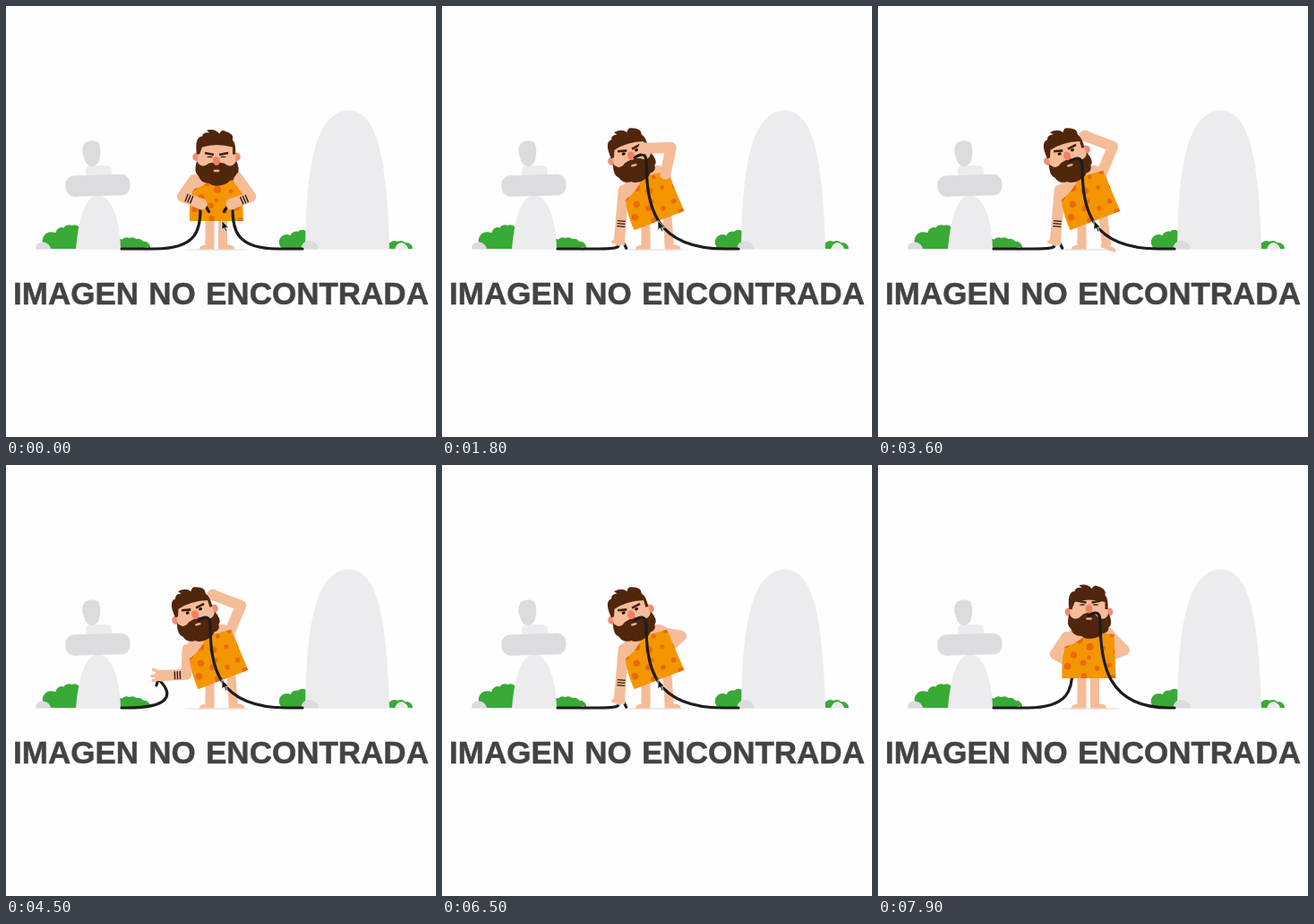
Write an HTML page that moves like this. It is 480 px wide and 481 px high and loops after 8000 ms.

```html
<!DOCTYPE html>
<html lang="es">
<head>
<meta charset="utf-8">
<title>Imagen no encontrada</title>
<style>
  html, body { margin: 0; width: 100%; height: 100%; overflow: hidden; background: #fefdff; }
  svg { display: block; width: 100vw; height: 100vh; }
  .skin { fill: #f5bc98; }
  .hair { fill: #50260d; }
  .pale { fill: #ecebed; }
  .grey { fill: #dcdbde; }
  .limb, .fingers { fill: none; stroke: #f5bc98; stroke-linecap: round; stroke-linejoin: round; }
  .limb { stroke-width: 12; }
  .leg { stroke-width: 10; }
  .fingers { stroke-width: 3.6; }
  .ink { fill: none; stroke: #2b1a14; stroke-width: 1.4; }
  .cable { fill: none; stroke: #1d1d1b; stroke-width: 3.2; stroke-linecap: round; }
</style>
</head>
<body>
<svg viewBox="0 0 480 481">
  <defs>
    <path id="cloth" d="M-30 0Q-31-20-27-35Q-10-40 0-52L28-49Q29-22 30 0Z"/>
    <clipPath id="clothClip"><use href="#cloth"/></clipPath>
  </defs>

  <g id="bushes" fill="#39aa35"></g>
  <path class="grey" d="M33 271.500Q33 263 42 263.500Q49 265 50 271.500Z"/>
  <circle class="pale" cx="157" cy="272" r="3"/>
  <path class="pale" d="M78 271.500C81 235 89 212 103 211C118 212 127 238 128 271.500Z"/>
  <rect class="pale" x="89" y="178" width="29" height="14" rx="6"/>
  <rect class="grey" x="66.500" y="188.500" width="72" height="23.500" rx="10" transform="rotate(-1.5 102 200)"/>
  <path class="grey" d="M88 153Q95 148 103 152Q107 160 104 172Q102 179 95 179Q89 178 87 169Q83 160 88 153Z"/>
  <path class="pale" d="M334 271.500C335 180 345 117 383 116.500C417 117 425 180 428 271.500Z"/>
  <path class="grey" d="M329 271.500Q330 262 339 262Q348 263 349 271.500Z"/>
  <path class="pale" d="M434 271.500Q436 264 442 264Q448 266 449 271.500Z"/>
  <ellipse cx="235" cy="272" rx="37" ry="1" fill="#e9e8eb"/>

  <g id="backSlot"></g>
  <path class="limb leg" d="M227.500 236V264"/>
  <path class="skin" d="M222.500 262H232.500V271.500H216Q216 267 222.500 267Z"/>
  <path id="leg" class="limb leg"/>
  <path id="foot" class="skin" d="M-5-5H5V0Q13 0 13 5H-5Z"/>
  <g id="body">
    <path class="skin" d="M-27-30L-25-46Q-22-56-10-60H14Q28-58 30-46L28-20Z"/>
    <use href="#cloth" fill="#f49600"/>
    <g id="spots" clip-path="url(#clothClip)" fill="#ea6a0a"></g>
  </g>
  <g id="frontLeftSlot"></g>
  <g id="head">
    <circle cx="-22" r="4.800" fill="#f08e74"/>
    <circle cx="22" r="4.800" fill="#f08e74"/>
    <rect class="skin" x="-21" y="-18" width="42" height="32" rx="4"/>
    <path class="hair" d="M-22-3C-24-15-22-23-16-23Q-15-28-8-27L-11-30Q-1-32 3-26Q6-31 9-29Q20-26 18-19Q22-13 21-3H18V-11Q0-16-16-11L-19-3Z"/>
    <path id="beard" class="hair" d="M-22 0C-19 7-14 7-9 3Q0 0 9 3C14 7 19 7 22 0C25 6 26 13 22 15Q22 22 15 22C11 28-4 30-8 25Q-18 25-20 17Q-26 13-22 0Z"/>
    <g id="face">
      <path class="hair" d="M0 1Q-6 0-11 7Q-4 9 0 5Q4 9 11 7Q6 0 0 1Z"/>
      <ellipse cy="7.500" rx="3.500" ry="1.300" fill="#f0ab91"/>
      <ellipse cy="-3.500" rx="4" ry="5" fill="#f27e68"/>
      <path d="M-13-12.500L-3-10.500M13-12.500L3-10.500" fill="none" stroke="#43200c" stroke-width="2.600"/>
      <ellipse class="eye" cx="-7.500" cy="-8" fill="#24130c"/>
      <ellipse class="eye" cx="7.500" cy="-8" fill="#24130c"/>
    </g>
  </g>
  <path id="rightCable" class="cable"/>
  <g id="frontRightSlot"></g>

  <g id="leftSide">
    <path id="leftCable" class="cable"/>
    <g id="leftArm"></g>
  </g>
  <g id="rightArm"></g>

  <path id="cursor" d="M241 239.500V250L243.500 247.800L245.300 252L247 251.200L245.200 247.200H248.600Z" fill="#111" stroke="#fff" stroke-width=".8"/>
  <text x="240" y="332.500" text-anchor="middle" font-family="'Liberation Sans', Arial, sans-serif" font-weight="700" font-size="35" word-spacing="1.5" fill="#434244" stroke="#434244" stroke-width=".5">IMAGEN NO ENCONTRADA</text>
</svg>
<script>
const LOOP = 8000, GROUND = 271;
const $ = id => document.getElementById(id);
const mix = (a, b, u) => a + (b - a) * u;
const draw = (el, d) => el.setAttribute('d', d);
const place = (el, x, y, angle = 0) => el.setAttribute('transform', `translate(${x} ${y}) rotate(${angle})`);
const eyes = document.querySelectorAll('.eye');

// Hip position, lean angle, how far the face looks down.
const posture = { hold: [235, 240, 0, 8], lean: [242.5, 239.5, -21, 4], back: [235.5, 238, 0, 0] };
// Hand position, elbow bend, direction of the plug, finger spread.
const leftHand = {
  hold: [218, 221, 18, 45, 0], ground: [198, 261, 0, 50, 4],
  raised: [173, 235, -19, 115, 9], back: [218, 222, 17, 45, 0]
};
// Hand position, elbow bend.
const rightHand = {
  hold: [252, 221, 18], up: [229, 130, -6], mouth: [225, 162, -26],
  scratch: [231, 145, -24], behind: [254, 203, 16], back: [256, 214, 17]
};
// Where the right cable is held, direction of the plug.
const rightPlug = { hold: [252, 221, 135], up: [229, 130, 150], mouth: [227, 172, 175], back: [247, 167, 175] };
const heel = { down: [0], raised: [1] };

// "name from-to" holds a pose; the gaps between holds are eased.
const track = (poses, plan) => plan.split(', ').flatMap(part => {
  const [name, span] = part.split(' ');
  return span.split('-').map(time => [+time, poses[name]]);
});
const tracks = {
  body: track(posture, 'hold 0-200, lean 800-6600, back 7200-8000'),
  left: track(leftHand, 'hold 0-200, ground 800-3700, raised 4200-4800, ground 5300-6600, back 7200-8000'),
  right: track(rightHand, 'hold 0-200, up 800-1150, mouth 1450-1750, up 2000-2150, mouth 2400-3100, scratch 3500-4700, up 5000-5000, behind 5400-6600, back 7200-8000'),
  plug: track(rightPlug, 'hold 0-200, up 800-1150, mouth 1450-1750, up 2000-2150, mouth 2400-6600, back 7200-8000'),
  heel: track(heel, 'down 0-2100, raised 2400-3300, down 3700-5200, raised 5500-6000, down 6300-8000')
};

function sample(keys, t) {
  const i = keys.findIndex(key => key[0] > t);
  const [t0, from] = keys[i - 1], [t1, to] = keys[i];
  const u = (t - t0) / (t1 - t0);
  return from.map((v, j) => mix(v, to[j], u * u * (3 - 2 * u)));
}

// A row of round lobes whose height rises to a peak and falls again.
function bush(x0, x1, height, lobes, peak) {
  let d = `M${x0} ${GROUND}`;
  for (let i = 0; i <= lobes; i++) {
    const u = i / lobes;
    const phase = u < peak ? u / peak / 2 : 1 - (1 - u) / (1 - peak) / 2;
    const y = GROUND - height * Math.sqrt(Math.max(0, Math.sin(Math.PI * phase)));
    d += `A7 7 0 0 1 ${mix(x0, x1, u)} ${y}`;
  }
  return `<path d="${d}Z"/>`;
}
$('bushes').innerHTML = bush(46, 92, 26, 5, .65) + bush(122, 161, 12, 5, .35) +
  bush(309, 360, 20, 6, .45) + bush(420, 454, 8, 4, .5);

// Spots spread over the cloth on a golden-angle spiral.
for (let i = 0; i < 20; i++) {
  const r = 8.6 * Math.sqrt(i), a = i * 2.4;
  $('spots').innerHTML += `<circle cx="${r * Math.cos(a)}" cy="${r * Math.sin(a) - 23}" r="${2.4 + i * 7 % 5 * .45}"/>`;
}

for (const id of ['leftArm', 'rightArm']) {
  $(id).innerHTML = '<path class="limb"/><g><circle class="skin" r="6.5"/><path class="fingers"/></g>' +
    '<path class="ink" d="M-3-5V4M0-5V4M3-5V4"/>';
}

function shoulder([x, y, tilt], side) {
  const a = tilt * Math.PI / 180, u = 25 * side, v = -46;
  return [x + u * Math.cos(a) - v * Math.sin(a), y + u * Math.sin(a) + v * Math.cos(a)];
}

function drawArm(id, body, side, [hx, hy, bend], spread, inked) {
  const [limb, hand, ink] = $(id).children;
  const [sx, sy] = shoulder(body, side);
  const k = bend * side / Math.hypot(hx - sx, hy - sy);
  const ex = (sx + hx) / 2 + (hy - sy) * k, ey = (sy + hy) / 2 - (hx - sx) * k;
  const angle = Math.atan2(hy - ey, hx - ex) * 180 / Math.PI;
  draw(limb, `M${sx} ${sy}L${ex} ${ey}L${hx} ${hy}`);
  place(hand, hx, hy, angle);
  draw(hand.lastChild, spread > .5 ? `M2-4L${spread}-5M3 0H${spread + 1}M2 4L${spread - 1} 7` : '');
  place(ink, mix(ex, hx, .35), mix(ey, hy, .35), angle);
  ink.style.display = inked ? '' : 'none';
}

// A hooked plug at the grip, then a cable that hangs down and runs along the ground.
function drawCable(id, side, [gx, gy, angle], anchor) {
  const a = angle * Math.PI / 180;
  const ex = gx + side, ey = gy + 6, drop = GROUND - ey;
  const run = Math.min(20 + .7 * drop, Math.abs(anchor - ex) - 6);
  const bulge = side < 0 ? Math.max(0, -Math.cos(a)) * 34 : 0;
  const tipX = gx + 12 * Math.cos(a), tipY = gy + 12 * Math.sin(a);
  draw($(id), `M${tipX} ${tipY}Q${gx} ${gy - 7} ${ex} ${ey}` +
    `C${ex + bulge} ${ey + drop * .5} ${ex + side * drop * .08 + bulge} ${GROUND} ${ex + side * run} ${GROUND}H${anchor}`);
}

function putIn(node, slot) {
  if (node.parentNode !== slot) slot.appendChild(node);
}

function render(t) {
  const pose = {};
  for (const name in tracks) pose[name] = sample(tracks[name], t);
  const [x, y, tilt, look] = pose.body, [lift] = pose.heel, [hx, hy, , plugAngle, spread] = pose.left;

  putIn($('leftSide'), $(t < 450 ? 'frontLeftSlot' : 'backSlot'));
  putIn($('rightArm'), $(t < 3250 ? 'frontRightSlot' : 'backSlot'));

  place($('body'), x, y, tilt);
  place($('head'), x + 1.5 * tilt, y - 74 + .3 * look, .8 * tilt);
  place($('face'), 0, look);
  place($('beard'), 0, 2 + .3 * look);
  const open = .7 - tilt * .045;
  for (const eye of eyes) {
    eye.setAttribute('rx', 4.2 - open * 1.3);
    eye.setAttribute('ry', open);
  }

  const hip = 242 - .45 * tilt, ankle = hip - .1 * tilt + 6 * lift, ankleY = 266.5 - 3 * lift;
  draw($('leg'), `M${hip} 236L${ankle} ${ankleY - 3}`);
  place($('foot'), ankle, ankleY, 125 * lift);

  drawArm('leftArm', pose.body, -1, pose.left, spread, t < 6900);
  drawArm('rightArm', pose.body, 1, pose.right, 0, t < 450);
  drawCable('leftCable', -1, [hx, hy, plugAngle], 129);
  drawCable('rightCable', 1, pose.plug, 331);
  $('cursor').style.display = t < 7000 ? '' : 'none';
}

const start = performance.now();
function tick() {
  render(Math.floor((performance.now() - start) % LOOP / 100) * 100);
  requestAnimationFrame(tick);
}
tick();
</script>
</body>
</html>
```
